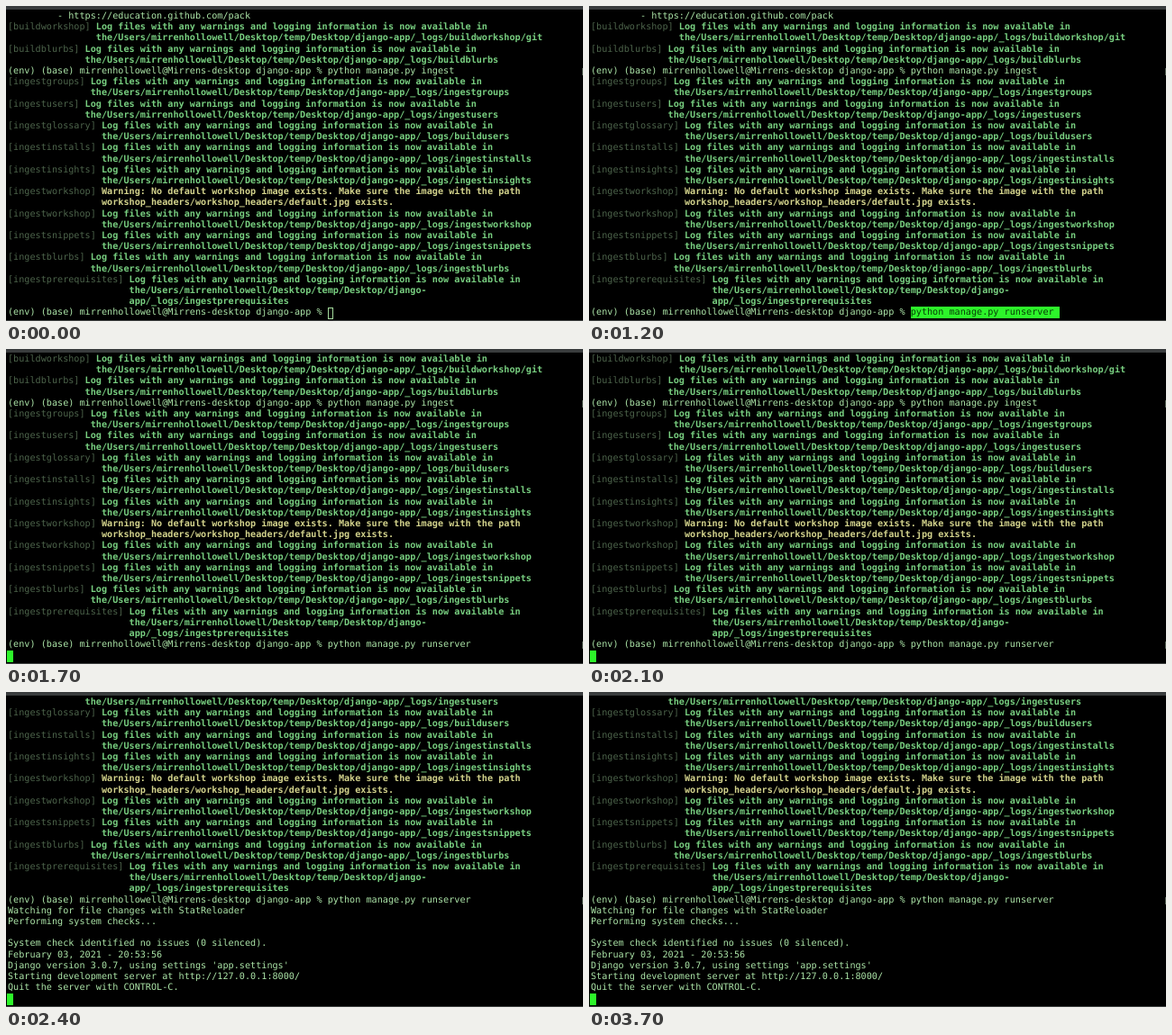
Write an HTML page that moves like this. It is 640 px wide and 350 px high and loops after 3800 ms.

```html
<!DOCTYPE html>
<html lang="en">
<head>
<meta charset="utf-8">
<title>Terminal: runserver</title>
<style>
  :root { --row: 12.2px; --green: #2df52a; }
  html, body { margin: 0; width: 100%; height: 100%; overflow: hidden; background: #000; }
  #stage {
    position: relative; width: 640px; height: 350px; overflow: hidden; background: #000;
    font: 10.17px/12.2px "DejaVu Sans Mono", "Liberation Mono", monospace;
    text-rendering: geometricPrecision; font-variant-ligatures: none;
    color: #ace5a8;
  }
  #stage::before, #stage::after { content: ""; position: absolute; left: 0; right: 0; }
  #stage::before { top: 0; height: 4px; background: #393c3d; }
  #stage::after { bottom: 0; height: 1px; background: #3a3d3c; }
  #view { position: absolute; inset: 5px 0 1px; overflow: hidden; }
  #buffer { position: absolute; left: 2px; top: 1px; }
  .row { position: absolute; left: 0; white-space: pre; height: var(--row); }
  .tag { color: #4d644b; }
  .log { color: #78cf80; font-weight: bold; }
  .warn { color: #d3d38c; font-weight: bold; }
  .mark { position: absolute; left: 637px; top: 2px; width: 1px; height: 8px; background: #566255; }
  .typed { padding: 1px 0; }
  #cursor { position: absolute; box-sizing: border-box; height: 13px; top: 335px; }

  #buffer, #cursor, .typed, .ran, .output { animation: 3.8s step-end infinite; }
  #buffer { animation-name: scroll; }
  #cursor { animation-name: cursor; }
  .typed { animation-name: paste; }
  .ran { animation-name: run; }
  .output { animation-name: serve; }

  @keyframes scroll {
    0% { margin-top: 0; }
    34.21% { margin-top: calc(var(--row) * -1); }
    63.157%, 100% { margin-top: calc(var(--row) * -9); }
  }
  @keyframes cursor {
    0% { left: 357px; width: 6px; border: 1px solid #a5dc9d; background: none; visibility: visible; }
    18.42% { visibility: hidden; }
    34.21%, 100% { left: 1px; width: 7px; border: 0 solid; background: var(--green); visibility: visible; }
  }
  @keyframes paste {
    0% { visibility: hidden; }
    18.42% { visibility: visible; color: #073d07; background: var(--green); }
    34.21%, 100% { visibility: visible; color: inherit; background: none; }
  }
  @keyframes run {
    0% { visibility: hidden; }
    34.21%, 100% { visibility: visible; }
  }
  @keyframes serve {
    0% { visibility: hidden; }
    63.157%, 100% { visibility: visible; }
  }
</style>
</head>
<body>
<div id="stage">
  <div id="view"><div id="buffer"></div></div>
  <div id="cursor"></div>
</div>
<script>
  const ROW = 12.2;
  const buffer = document.getElementById('buffer');
  const home = 'the/Users/mirrenhollowell/Desktop/temp/Desktop/django-';
  const prompt = '(env) (base) mirrenhollowell@Mirrens-desktop django-app % ';
  let count = 0;

  const span = (cls, text = '') => `<span class="${cls}">${text}</span>`;

  function addRow(html, cls = '') {
    const row = document.createElement('div');
    row.className = 'row ' + cls;
    row.style.top = (count++ * ROW).toFixed(1) + 'px';
    row.innerHTML = html;
    buffer.append(row);
  }

  // A dim tag followed by lines hanging from its right edge.
  function addEntry(name, lines, cls = 'log') {
    const tag = `[${name}] `;
    lines.forEach((line, i) =>
      addRow((i ? ' '.repeat(tag.length) : span('tag', tag)) + span(cls, line)));
  }

  function addLog(name, file = name, wrap = false) {
    const path = 'app/_logs/' + file;
    const intro = 'Log files with any warnings and logging information is now available in';
    addEntry(name, wrap ? [intro, home, path] : [intro, home + path]);
  }

  addRow(' '.repeat(9) + '- https://education.github.com/pack');
  addLog('buildworkshop', 'buildworkshop/git');
  addLog('buildblurbs');
  addRow(prompt + 'python manage.py ingest' + span('mark'));
  addLog('ingestgroups');
  addLog('ingestusers');
  addLog('ingestglossary', 'buildusers');
  addLog('ingestinstalls');
  addLog('ingestinsights');
  addEntry('ingestworkshop', [
    'Warning: No default workshop image exists. Make sure the image with the path',
    'workshop_headers/workshop_headers/default.jpg exists.'
  ], 'warn');
  addLog('ingestworkshop');
  addLog('ingestsnippets');
  addLog('ingestblurbs');
  addLog('ingestprerequisites', 'ingestprerequisites', true);
  addRow(prompt + span('typed', 'python manage.py runserver ') + span('mark ran'));
  [
    'Watching for file changes with StatReloader',
    'Performing system checks...',
    '',
    'System check identified no issues (0 silenced).',
    'February 03, 2021 - 20:53:56',
    "Django version 3.0.7, using settings 'app.settings'",
    'Starting development server at http://127.0.0.1:8000/',
    'Quit the server with CONTROL-C.'
  ].forEach(line => addRow(line, 'output'));
</script>
</body>
</html>
```
